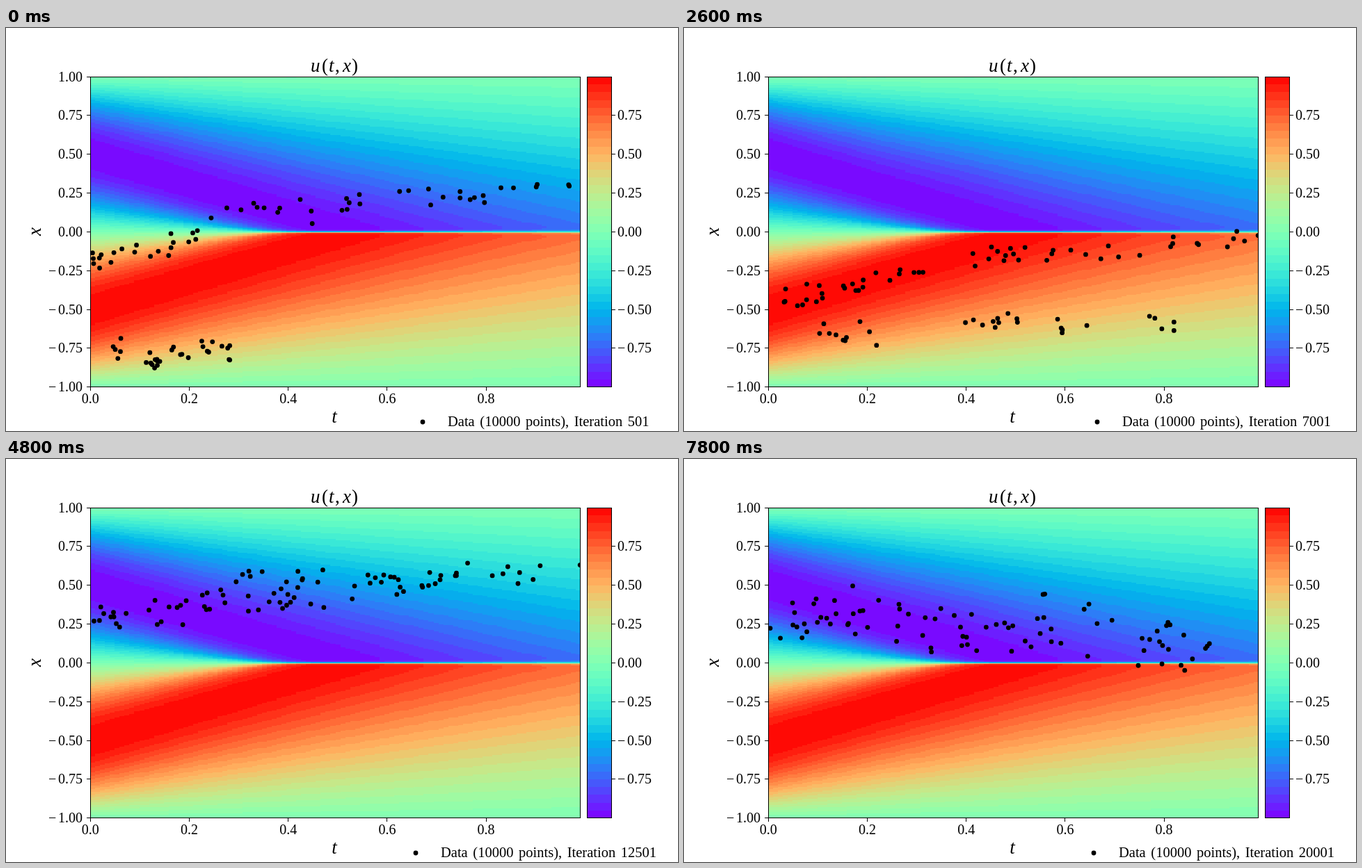
Recreate the animation shown at these times as an HTML page with a canvas. Size 966 by 580 pixels, loop 8000 ms.

```html
<!DOCTYPE html>
<html lang="en">
<head>
<meta charset="utf-8">
<title>Sample points over u(t, x)</title>
<style>
html, body { margin: 0; width: 966px; height: 580px; overflow: hidden; background: #fff; }
canvas { display: block; }
</style>
</head>
<body>
<canvas id="stage" width="966" height="580"></canvas>
<script>
const STEP_MS = 200, STEPS = 40;
const PLOT = { x: 121, y: 70, w: 705, h: 447 };
const BAR = { x: 835, y: 70, w: 36, h: 447 };
const SERIF = '"Liberation Serif", "Times New Roman", serif';
const ctx = document.getElementById('stage').getContext('2d');

const toX = t => 121.3 + t * 711;
const toY = x => 293.4 - x * 223.3;
const mix = (a, b, w) => a + (b - a) * w;

function layer(width, height) {
  const canvas = document.createElement('canvas');
  canvas.width = width;
  canvas.height = height;
  return canvas.getContext('2d');
}

// Burgers' equation, u(0, x) = -sin(pi x), by the Cole-Hopf integral.
function burgers(t, x) {
  if (t === 0) return -Math.sin(Math.PI * x);
  const nu = 0.01 / Math.PI, scale = Math.sqrt(4 * nu * t);
  let top = 0, bottom = 0;
  for (let z = -12; z <= 12; z += 0.12) {
    const angle = Math.PI * (x - scale * z);
    const weight = Math.exp(-50 * Math.cos(angle) - z * z);
    top -= Math.sin(angle) * weight;
    bottom += weight;
  }
  return top / bottom;
}

function rainbow(u) {
  const levels = 40;
  const band = Math.max(0, Math.min(levels - 1, Math.floor((u + 1) / 2 * levels)));
  const v = (band + 0.5) / levels;
  return [Math.abs(2 * v - 0.5), Math.sin(Math.PI * v), Math.cos(Math.PI * v / 2)]
    .map(c => Math.round(255 * Math.min(1, c)));
}

function raster(cols, rows, value) {
  const g = layer(cols, rows);
  const image = g.createImageData(cols, rows);
  for (let r = 0; r < rows; r++) {
    for (let c = 0; c < cols; c++) {
      image.data.set([...rainbow(value(c, r)), 255], 4 * (r * cols + c));
    }
  }
  g.putImageData(image, 0, 0);
  return g.canvas;
}

function write(g, text, x, y, size, align = 'left', style = '') {
  g.font = `${style} ${size}px ${SERIF}`;
  g.textAlign = align;
  g.fillText(text, x, y);
}

function tickLabel(g, value, right, y) {
  write(g, Math.abs(value).toFixed(2), right, y, 20, 'right');
  if (value < 0) write(g, '\u2212', right - 49, y, 20);
}

function drawChart() {
  const g = layer(966, 580);
  g.fillStyle = '#fff';
  g.fillRect(0, 0, 966, 580);
  g.imageSmoothingEnabled = false;
  const field = raster(100, 256, (c, r) => burgers(c * 0.01, 1 - 2 * r / 255));
  const scale = raster(1, 440, (c, r) => 1 - 2 * (r + 0.5) / 440);
  g.drawImage(field, PLOT.x, PLOT.y, PLOT.w, PLOT.h);
  g.drawImage(scale, BAR.x, BAR.y, BAR.w, BAR.h);

  g.fillStyle = '#000';
  for (let i = -4; i <= 4; i++) {
    const value = i / 4, y = toY(value);
    g.fillRect(116, Math.floor(y), 5, 1);
    tickLabel(g, value, 110, y + 6.5);
    if (Math.abs(i) < 4) {
      g.fillRect(871, Math.floor(y), 5, 1);
      tickLabel(g, value, value < 0 ? 928 : 914, y + 6.5);
    }
  }
  for (let i = 0; i < 5; i++) {
    const x = toX(i / 5);
    g.fillRect(Math.floor(x), 517, 1, 5);
    write(g, (i / 5).toFixed(1), x, 540, 20, 'center');
  }

  write(g, 'u', 438, 63, 27, 'left', 'italic');
  write(g, '(', 454, 63, 27);
  write(g, 't', 464, 63, 27, 'left', 'italic');
  write(g, ',', 473, 63, 27);
  write(g, 'x', 484, 63, 27, 'left', 'italic');
  write(g, ')', 497, 63, 27);
  write(g, 't', 472, 568, 27, 'center', 'italic');
  g.save();
  g.translate(50, 293);
  g.rotate(-Math.PI / 2);
  write(g, 'x', 0, 0, 27, 'center', 'italic');
  g.restore();
  return g.canvas;
}

// Points gather on a main strand across the plot and a shorter side strand.
// main: x at t = 0, 0.3, 1; side: t, x at both ends. x wraps from -1 to 1.
const poses = [
  { step: 0, main: [-.2, .1, .33], side: [.04, -.8, .3, -.78], spread: .08 },
  { step: 8, main: [-.4, -.22, -.12], side: [0, -.75, .65, -.4], spread: .09 },
  { step: 13, main: [-.48, -.25, -.06], side: [.02, -.65, .82, -.57], spread: .08 },
  { step: 20, main: [-.08, -.04, .14], side: [.12, -.5, .47, -.95], spread: .09 },
  { step: 24, main: [.3, .36, .62], side: [.15, -1.57, .74, -1.38], spread: .08 },
  { step: 32, main: [.3, .15, .03], side: [0, -1.5, .6, -1.6], spread: .13 },
  { step: 39, main: [.3, .17, .05], side: [0, -1.6, .9, -1.8], spread: .13 },
];

function poseAt(step) {
  const next = Math.max(1, poses.findIndex(p => p.step >= step));
  const a = poses[next - 1], b = poses[next];
  const w = (step - a.step) / (b.step - a.step);
  const blend = (from, to) => from.map((v, i) => mix(v, to[i], w));
  return {
    main: blend(a.main, b.main),
    side: blend(a.side, b.side),
    spread: mix(a.spread, b.spread, w),
  };
}

function randomFrom(seed) {
  let state = seed * 7919 + 12345;
  return () => {
    state = (Math.imul(state, 1664525) + 1013904223) >>> 0;
    return state / 4294967296;
  };
}

function dot(x, y) {
  ctx.beginPath();
  ctx.arc(x, y, 3.4, 0, 2 * Math.PI);
  ctx.fill();
}

function drawPoints(step) {
  const random = randomFrom(step + 1);
  const around = size => size * (random() + random() - 1);
  const { main, side: [t0, x0, t1, x1], spread } = poseAt(step);
  const mainX = t => t < 0.3
    ? mix(main[0], main[1], t / 0.3)
    : mix(main[1], main[2], (t - 0.3) / 0.7);

  function strand(clumps, place) {
    for (let i = 0; i < clumps; i++) {
      const centre = (i + random()) / clumps, shift = around(spread);
      for (let j = 0; j < 5; j++) {
        const [t, x] = place(Math.min(1, Math.abs(centre + around(0.09))));
        const y = x + shift + around(spread);
        dot(toX(t), toY(y < -1 ? y + 2 : y));
      }
    }
  }

  ctx.save();
  ctx.beginPath();
  ctx.rect(PLOT.x, PLOT.y, PLOT.w, PLOT.h);
  ctx.clip();
  strand(11, s => {
    const t = 0.99 * s ** 1.3;
    return [t, mainX(t)];
  });
  strand(6, s => [mix(t0, t1, s), mix(x0, x1, s)]);
  ctx.restore();
}

function drawLegend(step) {
  const iteration = 501 + 500 * step;
  const left = 650 - 5 * String(iteration).length;
  dot(left - 36, 567);
  ctx.wordSpacing = '2.5px';
  write(ctx, `Data (10000 points), Iteration ${iteration}`, left, 572.5, 20.5);
}

function frameBox({ x, y, w, h }) {
  ctx.strokeRect(x + 0.5, y + 0.5, w - 1, h - 1);
}

const chart = drawChart();

function draw(step) {
  ctx.drawImage(chart, 0, 0);
  drawPoints(step);
  frameBox(PLOT);
  frameBox(BAR);
  drawLegend(step);
}

let start, shown = 0;
draw(0);
requestAnimationFrame(function tick(now) {
  start ??= now;
  const step = Math.floor((now - start) / STEP_MS) % STEPS;
  if (step !== shown) draw(shown = step);
  requestAnimationFrame(tick);
});
</script>
</body>
</html>
```
